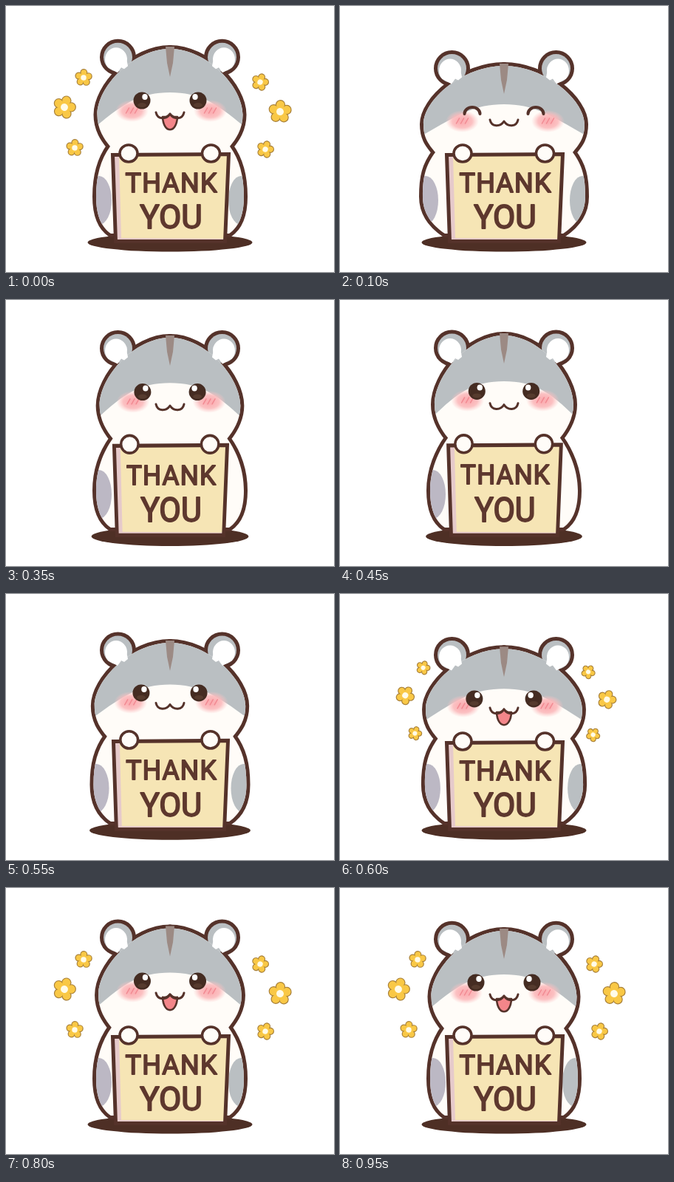
An HTML page with a canvas for the animation above (1 s loop, 444 by 360 pixels).

```html
<!DOCTYPE html>
<html lang="en">
<head>
<meta charset="utf-8">
<title>Thank you</title>
<style>
  html, body { margin: 0; width: 100%; height: 100%; overflow: hidden; background: #fff; }
  canvas { display: block; }
</style>
</head>
<body>
<canvas id="stage" width="444" height="360"></canvas>
<script>
const ctx = document.getElementById('stage').getContext('2d');
const MID = 222, STEP = 50, TAU = Math.PI * 2;
const DARK = '#55322a', GREY = '#babfc2', WHITE = '#fffcf8';

// squash of the body per step: 0 = upright, 1 = flattest, below 0 = stretched
const SQUASH = [0, .6, 1, .98, .7, .3, -.05, -.3, -.43, -.43,
                -.1, .35, .71, .75, .48, .15, -.15, -.33, -.25, 0];
// x, y, radius
const FLOWERS = [[-117, 97, 12], [-143, 137, 16], [-129, 192, 12],
                 [122, 103, 12], [149, 143, 16], [129, 194, 12]];

function oval(x, y, rx, ry, fill) {
  ctx.beginPath();
  ctx.ellipse(x, y, rx, ry, 0, 0, TAU);
  if (fill) { ctx.fillStyle = fill; ctx.fill(); }
}

function stroke(width, color = DARK) {
  ctx.lineWidth = width;
  ctx.strokeStyle = color;
  ctx.stroke();
}

function poly(points, fill) {
  ctx.beginPath();
  points.forEach(([x, y]) => ctx.lineTo(x, y));
  ctx.closePath();
  ctx.fillStyle = fill;
  ctx.fill();
}

// runs draw once per side, the right one mirrored
function sides(draw) {
  for (const s of [1, -1]) {
    ctx.save();
    ctx.scale(s, 1);
    draw(s === 1);
    ctx.restore();
  }
}

function halfBody(u) {
  const top = 58 + 23 * u, hw = 98.5 + 10.5 * u, hy = 147 + 13 * u;
  const wx = 81 + 12 * u, wy = 190 + 8 * u, bw = 100 + 10 * Math.max(u, 0);
  const p = new Path2D();
  p.moveTo(0, top);
  p.bezierCurveTo(-hw * .51, top, -hw, hy - .42 * (hy - top), -hw, hy);
  p.bezierCurveTo(-hw, hy + 20, -wx - 8, wy - 10, -wx, wy);
  p.bezierCurveTo(-wx - 13, wy + 18, -bw, 230, -bw, 258);
  p.bezierCurveTo(-bw, 285, -92, 300, -80, 308);
  p.lineTo(0, 308);
  return { p, bw, hw };
}

function body(u, ears, hideRight) {
  const { p, bw, hw } = halfBody(u);
  sides(() => {
    ctx.lineWidth = 10;
    ctx.strokeStyle = DARK;
    ctx.stroke(p);
    oval(-70.5, ears, 19.5, 19.5);
    stroke(10);
  });
  sides(left => {
    oval(-70.5, ears, 19.5, 19.5, GREY);
    ctx.fillStyle = WHITE;
    ctx.fill(p);
    ctx.save();
    ctx.clip(p);
    const peak = 117 + 16 * u, edge = 164 + 12 * u;
    ctx.beginPath();
    ctx.moveTo(0, 0);
    ctx.lineTo(0, peak);
    ctx.bezierCurveTo(-40, peak, -62, peak + 14, -hw - 3, edge);
    ctx.lineTo(-hw - 3, 0);
    ctx.fillStyle = GREY;
    ctx.fill();
    if (left || !hideRight) oval(4 - bw, 263, 17, 33, left ? '#bcb8c4' : GREY);
    ctx.restore();
    // inner ear
    ctx.beginPath();
    ctx.ellipse(-73, ears + 3, 15, 16, 0, Math.PI * .75, Math.PI * 2.05);
    ctx.lineTo(-57, ears + 12);
    ctx.lineTo(-62, ears + 16);
    ctx.lineTo(-66, ears + 14);
    ctx.lineTo(-71, ears + 21);
    ctx.fillStyle = '#fff';
    ctx.fill();
  });
  const top = 55 + 23 * u;
  poly([[-6, top], [6, top], [4, top + 22], [0, top + 41], [-4, top + 22]], '#9c8a84');
}

function cheek(x, y) {
  ctx.save();
  ctx.translate(x, y);
  ctx.scale(1.5, 1);
  const g = ctx.createRadialGradient(0, 0, 3, 0, 0, 15);
  g.addColorStop(0, '#fbafb3');
  g.addColorStop(.5, '#fbb8badd');
  g.addColorStop(1, '#fcc8c800');
  oval(0, 0, 15, 15, g);
  ctx.restore();
  ctx.beginPath();
  for (const d of [-6, 0, 6]) {
    ctx.moveTo(x + d - 2, y + 3);
    ctx.lineTo(x + d + 2, y - 4);
  }
  stroke(1.5, '#f28a92');
}

function face(u, asleep, smile) {
  const eyeX = 38 + 3 * u, eyeY = 128 + 14 * u + 8 * u * u;
  for (const s of [-1, 1]) {
    cheek(s * (53 + 5 * u) + 1.5, 142 + 14 * u);
    if (asleep) {
      ctx.beginPath();
      ctx.ellipse(s * (eyeX + 2), 133 + 13 * u, 10.5, 9, 0, Math.PI, TAU);
      stroke(4);
    } else {
      oval(s * eyeX, eyeY, 11.5, 11.5, '#452c22');
      oval(s * eyeX, eyeY + 6, 6, 3, '#563b2e');
      oval(s * (eyeX - 4), eyeY - 5, 3.7, 4, '#fff');
    }
  }
  const y = 148 + (smile ? 14 : 10) * u;
  if (smile) {
    ctx.beginPath();
    ctx.moveTo(-10, y + 2);
    ctx.bezierCurveTo(-9, y + 25, 9, y + 25, 10, y + 2);
    ctx.quadraticCurveTo(4, y + 3, 0, y - 2);
    ctx.quadraticCurveTo(-4, y + 3, -10, y + 2);
    ctx.fillStyle = '#f3868a';
    ctx.fill();
    stroke(2.6);
  }
  ctx.beginPath();
  ctx.moveTo(-19, y - 4);
  ctx.bezierCurveTo(-17, y + 6, -5, y + 6, 0, y - 2);
  ctx.bezierCurveTo(5, y + 6, 17, y + 6, 19, y - 4);
  stroke(3);
}

function word(text, size, baseline, spacing) {
  ctx.font = `400 ${size}px Roboto, sans-serif`;
  ctx.letterSpacing = spacing + 'px';
  ctx.fillStyle = ctx.strokeStyle = '#5e382e';
  ctx.lineWidth = 1.8;
  ctx.fillText(text, 1.5 + spacing / 2, baseline);
  ctx.strokeText(text, 1.5 + spacing / 2, baseline);
}

function sign() {
  const board = [[-77.5, 201.5], [79.5, 200.5], [74.5, 318.5], [-73.5, 318.5]];
  poly(board, '#f6e5b5');
  poly([[-78, 202], [-69, 202], [-66, 314], [74, 315], [74, 318], [-73, 318]], '#e6cacb');
  ctx.beginPath();
  board.forEach(([x, y]) => ctx.lineTo(x, y));
  ctx.closePath();
  ctx.lineJoin = 'miter';
  stroke(5);
  ctx.lineJoin = 'round';
  ctx.textAlign = 'center';
  word('THANK', 36, 252, 1.2);
  word('YOU', 44, 301, 0);
  for (const x of [-56, 55.5]) {
    oval(x, 199.5, 12, 11.5, WHITE);
    stroke(3.5);
  }
}

function flower(x, y, r, turn) {
  ctx.save();
  ctx.translate(x, y);
  ctx.rotate(turn);
  const petals = (size, color) => {
    for (let i = 0; i < 5; i++) {
      const a = i * TAU / 5 - Math.PI / 2;
      oval(Math.cos(a) * r * .58, Math.sin(a) * r * .58, size, size, color);
    }
  };
  petals(r * .42, '#a8803a');
  petals(r * .42 - 1.2, '#f9c846');
  oval(0, 0, r * .5, r * .5, '#f9c846');
  oval(0, 0, r * .31, r * .31, '#fffbe8');
  ctx.restore();
}

function draw(now) {
  const n = Math.floor(now % 1000 / STEP);
  const u = SQUASH[n];
  const smile = n >= 12 || n < 1;
  const asleep = n >= 1 && n < 7;
  const x = Math.min(1, Math.max(0, (u + .43) / 1.43));
  const ears = 65 + 19.5 * x * x * (3 - 2 * x);
  const lift = smile ? 0 : (1 - u) * .027;

  ctx.setTransform(1, 0, 0, 1, 0, 0);
  ctx.fillStyle = '#fff';
  ctx.fillRect(0, 0, 444, 360);
  ctx.translate(MID, 0);
  ctx.lineCap = ctx.lineJoin = 'round';

  const stretch = (narrow, paint) => {
    ctx.save();
    ctx.translate(0, 320);
    ctx.scale(1 - narrow, 1 + lift);
    ctx.translate(0, -320);
    paint();
    ctx.restore();
  };
  stretch(lift * 1.3, () => oval(0, 320, 111.5, 12.5, '#4e2f25'));
  body(u, ears, !smile && u < -.2);
  face(u, asleep, smile);
  stretch(lift * .7, sign);

  if (smile) {
    const grow = n === 12 ? 0 : n === 13 ? .6 : 1;
    const spread = .935 + .065 * grow;
    FLOWERS.forEach(([fx, fy, r], i) =>
      flower(fx * spread, 140 + (fy - 140) * spread, r * (.82 + .18 * grow),
             .15 + (i % 2 ? .15 : -.1) + (1 - grow) * .3));
  }
}

function loop() {
  draw(performance.now());
  requestAnimationFrame(loop);
}
loop();
</script>
</body>
</html>
```
